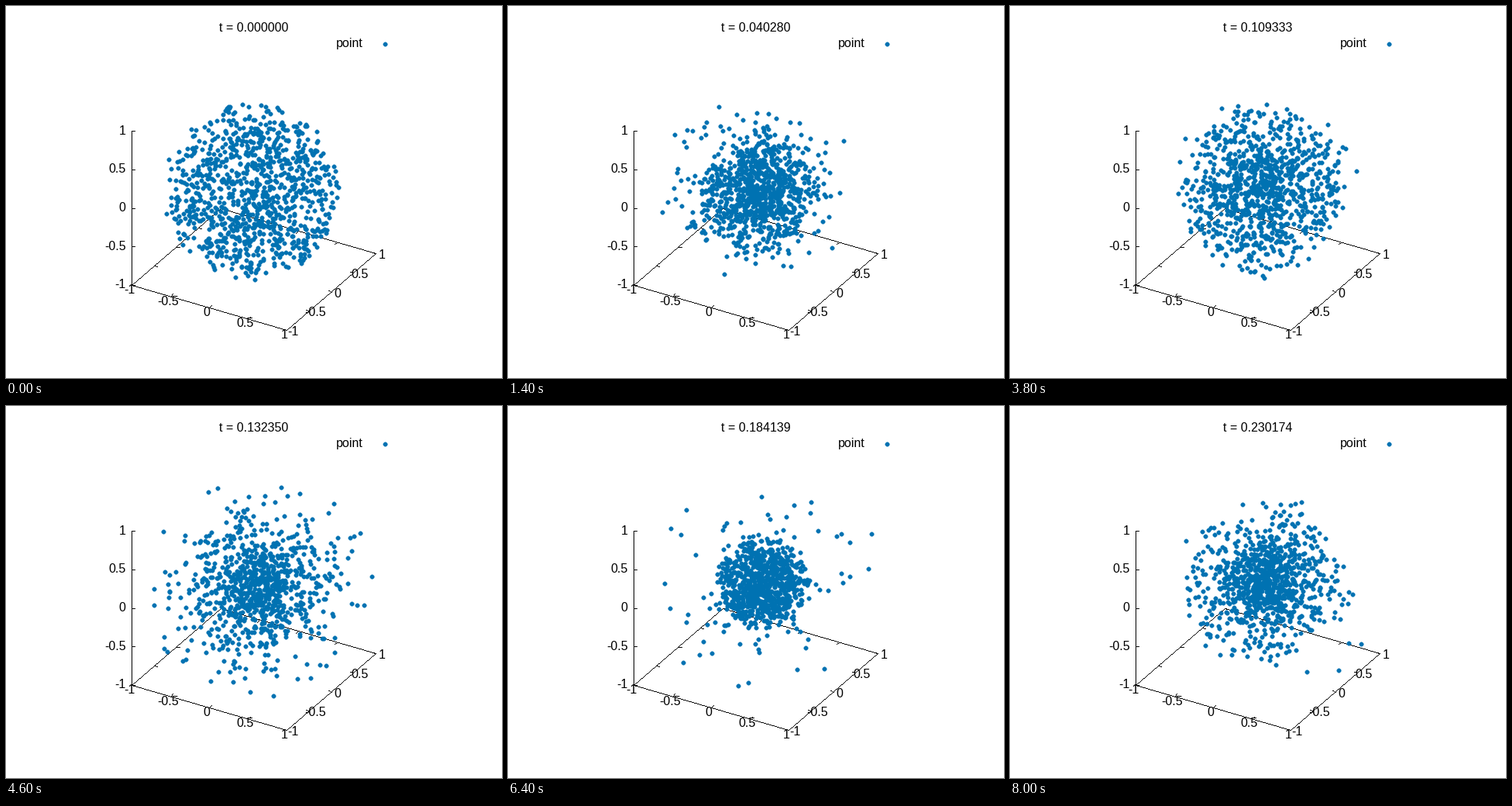
Recreate the animation shown at these times as a matplotlib script. Size 640x480 px, loop 8100 ms.

```python
import numpy as np
import matplotlib.pyplot as plt
from matplotlib.animation import FuncAnimation
from matplotlib.path import Path

FRAMES, SUBSTEPS, COUNT = 81, 4, 1000
FRAME_TIME = 0.002877175
SOFTENING = 0.5
SPEED_SPREAD = 0.2
DRIFT = (0.012, 0.010, 0.015)

DPI = 80
PX = 72 / DPI
BLUE = "#0072B2"


def initial_state():
    """Uniform unit ball with a small random velocity per body."""
    rng = np.random.default_rng(12)
    pos = rng.normal(size=(COUNT, 3))
    pos *= (np.cbrt(rng.random(COUNT)) / np.linalg.norm(pos, axis=1))[:, None]
    pos -= pos.mean(axis=0)
    vel = rng.normal(0, SPEED_SPREAD, (COUNT, 3))
    vel += np.array(DRIFT) - vel.mean(axis=0)
    return pos.astype(np.float32), vel.astype(np.float32)


def gravity(pos):
    """Softened attraction between all pairs, total mass 1."""
    sq = (pos * pos).sum(axis=1)
    dist2 = pos @ (-2 * pos.T)
    dist2 += sq[:, None]
    dist2 += sq + np.float32(SOFTENING ** 2)
    weight = np.sqrt(dist2)
    weight *= dist2
    np.reciprocal(weight, out=weight)
    pull = weight @ pos - pos * weight.sum(axis=1)[:, None]
    return pull / np.float32(COUNT)


def simulate():
    pos, vel = initial_state()
    dt = np.float32(FRAME_TIME * np.sqrt(COUNT) / SUBSTEPS)
    acc = gravity(pos)
    states = [pos]
    for _ in range(FRAMES - 1):
        for _ in range(SUBSTEPS):
            vel = vel + acc * (dt / 2)
            pos = pos + vel * dt
            acc = gravity(pos)
            vel = vel + acc * (dt / 2)
        states.append(pos)
    return states


def project(x, y, z):
    """Unit cube to stage pixels, y down."""
    return (319.5 + 100 * x + 57.5 * y,
            241 + 29 * x - 49.5 * y - 99.5 * z)


fig = plt.figure(figsize=(640 / DPI, 480 / DPI), dpi=DPI, facecolor="white")
ax = fig.add_axes([0, 0, 1, 1])
ax.set_xlim(0, 640)
ax.set_ylim(480, 0)
ax.axis("off")


def line(start, end):
    """Hard-edged line, one pixel wide."""
    start, end = np.round(start), np.round(end)
    steps = int(np.abs(end - start).max()) + 1
    xs, ys = np.round(np.linspace(start, end, steps)).T
    ax.plot(xs, ys, ls="none", marker=",", color="black", zorder=1)


def label(x, y, text, ha="center"):
    """Text whose digits are centred on y."""
    return ax.text(x, y + 5.5, text, ha=ha, va="baseline", zorder=2,
                   family="Liberation Sans", size=16 * PX)


def tick(start, dx, dy):
    line(start, (start[0] + dx, start[1] + dy))


corners = [project(x, y, -1) for x, y in ((-1, -1), (1, -1), (1, 1), (-1, 1))]
for i, corner in enumerate(corners):
    line(corner, corners[i - 1])
line(corners[0], project(-1, -1, 1))

for value in (-1, -0.5, 0, 0.5, 1):
    text = f"{value:g}"

    front, back = project(value, -1, -1), project(value, 1, -1)
    tick(front, 3, -3)
    tick(back, -3, 3)
    label(front[0] - 3, front[1] + 4.5, text)

    left, right = project(-1, value, -1), project(1, value, -1)
    tick(left, 4, 1)
    tick(right, -4, -1)
    label(right[0] + 8.5, right[1] + 0.5, text)

    upright = project(-1, -1, value)
    tick(upright, 4, 0)
    label(154.5, upright[1] - 2, text, ha="right")

title = label(319.5, 27.5, "")
label(461, 47.5, "point", ha="right")

# Small bold asterisk: a plus with a shorter diagonal cross
spokes = [(3, 0), (0, 3), (2, 2), (2, -2)]
asterisk = Path([p for x, y in spokes for p in ((-x, -y), (x, y))],
                [Path.MOVETO, Path.LINETO] * len(spokes))
point_style = dict(ls="none", marker=asterisk, ms=6 * PX, mew=2 * PX,
                   mec=BLUE, mfc="none", antialiased=False, zorder=3)
ax.plot([489], [49], **point_style)
cloud, = ax.plot([], [], **point_style)

states = simulate()


def update(frame):
    pos = states[frame]
    inside = pos[np.abs(pos).max(axis=1) <= 1]
    x, y = project(*inside.T)
    cloud.set_data(np.round(x), np.round(y))
    title.set_text(f"t = {frame * FRAME_TIME:.6f}")
    return cloud, title


anim = FuncAnimation(fig, update, frames=FRAMES, interval=100,
                     repeat=True, repeat_delay=0, blit=False)
plt.show()
```
